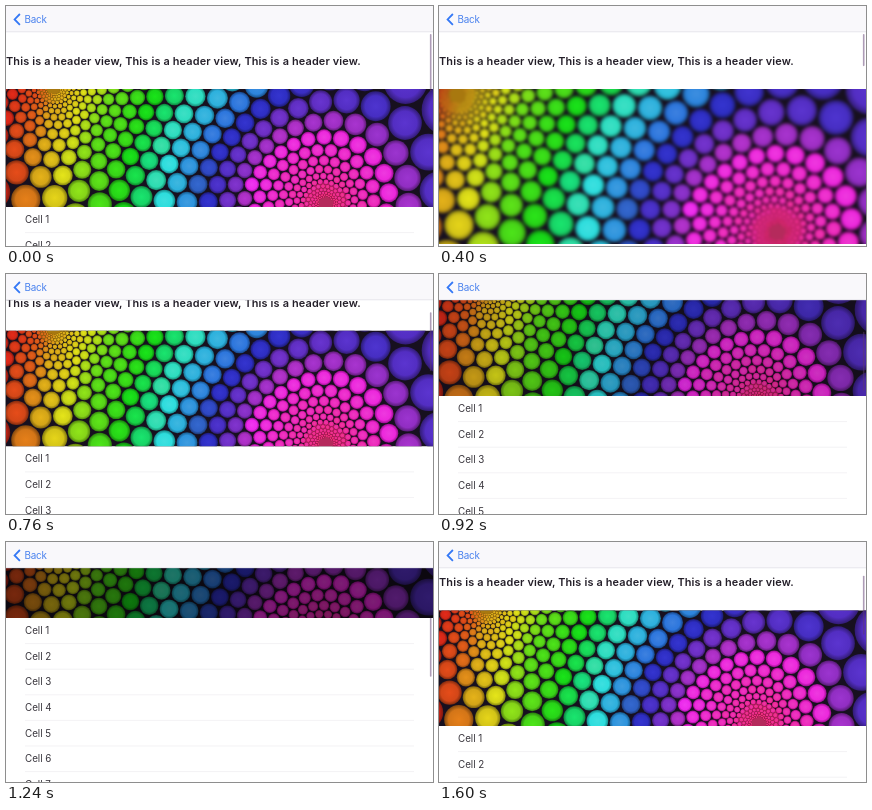
An HTML page for the animation above (1640 ms loop, 427 px wide and 240 px high).

```html
<!DOCTYPE html>
<html lang="en">
<head>
<meta charset="utf-8">
<title>Stretchy list header</title>
<style>
  html, body { margin: 0; width: 100%; height: 100%; overflow: hidden; background: #fff; }
  svg { display: block; width: 100vw; height: 100vh; }
  text { font-family: Inter, "Liberation Sans", sans-serif; }
</style>
</head>
<body>
<svg id="stage" viewBox="0 0 427 240" xmlns="http://www.w3.org/2000/svg">
  <defs>
    <clipPath id="frame"><rect id="crop" width="427"/></clipPath>
    <filter id="soft" x="-20" y="0" width="467" height="270" filterUnits="userSpaceOnUse" color-interpolation-filters="sRGB">
      <feGaussianBlur id="blur" stdDeviation="0"/>
    </filter>
  </defs>
  <rect width="427" height="240" fill="#fff"/>
  <g id="cells" font-size="9.8" fill="#39363d"></g>
  <text id="title" x="0" font-size="10.9" letter-spacing=".155" font-weight="600" fill="#241f29">This is a header view, This is a header view, This is a header view.</text>
  <g clip-path="url(#frame)">
    <g id="lens"><g id="discs"></g></g>
    <rect id="shade" width="427" height="240"/>
  </g>
  <rect width="427" height="26" fill="#f9f8fb"/>
  <path d="M0 25.8H427" stroke="#d8d7e0" stroke-width=".6"/>
  <path d="M13.9 8 8.6 13.4 13.9 18.8" fill="none" stroke="#3478f6" stroke-width="1.8"/>
  <text x="18.5" y="16.8" font-size="9.9" letter-spacing="-.2" fill="#4a82ee">Back</text>
  <rect id="bar" x="423.9" width="1.6" rx=".8" fill="#5d3a70" opacity=".5"/>
</svg>
<script>
const NS = 'http://www.w3.org/2000/svg';
const $ = id => document.getElementById(id);
const LOOP = 1640, STEP = 40;
const NAV = 26, HEAD = 57, REST = 115.5, PHOTO = 132, ROW = 25.6;

function add(parent, tag, attrs, text) {
  const el = document.createElementNS(NS, tag);
  for (const k in attrs) el.setAttribute(k, attrs[k]);
  if (text) el.textContent = text;
  parent.appendChild(el);
  return el;
}
const set = (id, attrs) => { for (const k in attrs) $(id).setAttribute(k, attrs[k]); };

// Hue by distance from the magenta pole
const HUES = [[0, 340], [30, 320], [74, 303], [88, 277], [105, 254], [120, 236], [140, 205],
  [162, 182], [185, 145], [205, 115], [240, 95], [255, 70], [270, 55], [290, 43], [310, 16], [335, 5]];

function hueAt(x, y, d) {
  let i = 1;
  while (i < HUES.length - 1 && d > HUES[i][0]) i++;
  const [a, b] = [HUES[i - 1], HUES[i]];
  const k = Math.min(1, (d - a[0]) / (b[0] - a[0]));
  const hue = a[1] + (b[1] - a[1]) * k;
  return x > 280 ? Math.max(hue, 246 + (x - 280) * .07) : hue;
}

function toneOf(h) {
  if (h > 215 && h < 292) return [62, 47];
  if (h >= 292) return [84, 54];
  return h > 150 ? [72, 52] : [80, 46];
}

// Hexagonal lattice rolled into a double spiral between two poles
function buildDiscs() {
  const A = [320, 122], B = [47, 5], anchor = [399, 41];
  const P = 6, Q = 20, span = Math.hypot(A[0] - B[0], A[1] - B[1]);
  const dist = (x, y, p) => Math.hypot(x - p[0], y - p[1]);
  const ang = (x, y, p) => Math.atan2(y - p[1], x - p[0]);
  const pitch = 2 * Math.PI / Math.hypot(P + Q / 2, Q * .866);
  const turn = Math.PI / 2 - Math.atan2(Q * .866, P + Q / 2);
  const u0 = Math.log(dist(...anchor, A) / dist(...anchor, B));
  const v0 = ang(...anchor, A) - ang(...anchor, B);
  const g = $('discs'), defs = $('stage').querySelector('defs');
  add(g, 'rect', { x: -20, y: -20, width: 467, height: 172, fill: '#17101f' });
  add(g, 'circle', { cx: A[0], cy: A[1], r: 22, fill: '#b52a5c' });
  add(g, 'circle', { cx: B[0], cy: B[1], r: 16, fill: '#a8780f' });

  const paints = {};
  const paint = hue => {
    const h = Math.round(hue / 5) * 5;
    if (!paints[h]) {
      const [sat, lum] = toneOf(h);
      const grad = add(defs, 'radialGradient', { id: 'c' + h });
      [[0, lum + 4], [.7, lum], [1, lum * .6]].forEach(([offset, l]) =>
        add(grad, 'stop', { offset, 'stop-color': `hsl(${h} ${sat}% ${l}%)` }));
      paints[h] = `url(#c${h})`;
    }
    return paints[h];
  };

  for (let n = 0; n < Q; n++) for (let m = -80; m <= 80; m++) {
    const u = u0 + pitch * (m * Math.cos(turn) + n * Math.cos(turn + Math.PI / 3));
    const v = v0 + pitch * (m * Math.sin(turn) + n * Math.sin(turn + Math.PI / 3));
    const ex = Math.exp(u) * Math.cos(v), ey = Math.exp(u) * Math.sin(v);
    const q = (1 - ex) ** 2 + ey ** 2;
    if (q < .002) continue;
    // z = B + (A - B) / (1 - e^w)
    const re = (1 - ex) / q, im = ey / q, dx = A[0] - B[0], dy = A[1] - B[1];
    const x = B[0] + dx * re - dy * im, y = B[1] + dx * im + dy * re;
    const r = pitch * .47 * dist(x, y, A) * dist(x, y, B) / span;
    if (r < .9 || r > 30 || x < -r || x > 427 + r || y < -r || y > PHOTO + r) continue;
    add(g, 'circle', { cx: x.toFixed(1), cy: y.toFixed(1), r: r.toFixed(2), fill: paint(hueAt(x, y, dist(x, y, A))) });
  }
}

function buildCells() {
  for (let i = 0; i < 9; i++) {
    add($('cells'), 'text', { x: 19, y: i * ROW + 16.2 }, 'Cell ' + (i + 1));
    add($('cells'), 'path', { d: `M19 ${(i + 1) * ROW}H408`, stroke: '#ebeaed', 'stroke-width': .6 });
  }
}

// Scroll offset over one loop; negative values are the rubber-band pull
const KEYS = [[0, -2.5], [160, -28], [330, -44], [400, -39.5], [640, -6.5], [920, 76.5],
  [1080, 123.5], [1160, 134], [1240, 122.5], [1400, 77.5], [1600, 14.5]];

function key(i) {
  const n = KEYS.length, lap = Math.floor(i / n);
  const [t, s] = KEYS[i - lap * n];
  return [t + lap * LOOP, s];
}

function scrollAt(t) {
  let i = 0;
  while (key(i + 1)[0] <= t) i++;
  const [p, a, b, q] = [key(i - 1), key(i), key(i + 1), key(i + 2)];
  const d = b[0] - a[0], k = (t - a[0]) / d;
  const ma = (b[1] - p[1]) / (b[0] - p[0]) * d, mb = (q[1] - a[1]) / (q[0] - a[0]) * d;
  const k2 = k * k, k3 = k2 * k;
  return (2 * k3 - 3 * k2 + 1) * a[1] + (k3 - 2 * k2 + k) * ma + (3 * k2 - 2 * k3) * b[1] + (k3 - k2) * mb;
}

function draw(t) {
  const s = scrollAt(t), up = Math.max(0, s), pull = Math.max(0, -s);
  const top = Math.max(NAV, NAV + HEAD - up), bottom = NAV + HEAD + REST - s, h = bottom - top;
  const zoom = Math.max(1, h / PHOTO);
  set('crop', { y: top, height: h });
  set('discs', { transform: `translate(213.5 ${top + h / 2}) scale(${zoom}) translate(-213.5 ${-PHOTO / 2})` });
  const soft = pull > 8 ? (pull - 8) * .058 : 0;
  set('blur', { stdDeviation: soft });
  set('lens', { filter: soft ? 'url(#soft)' : 'none' });
  set('shade', { opacity: Math.max(0, 1 - h / REST) * .85 });
  set('title', { y: 58.8 - up });
  set('cells', { transform: `translate(0 ${bottom})` });
  set('bar', { y: 28 + up * .39, height: 59 - pull * .68 });
}

buildDiscs();
buildCells();
const start = performance.now();
function tick() {
  const t = (performance.now() - start) % LOOP;
  draw(Math.floor(t / STEP) * STEP);
  requestAnimationFrame(tick);
}
draw(0);
requestAnimationFrame(tick);
</script>
</body>
</html>
```
